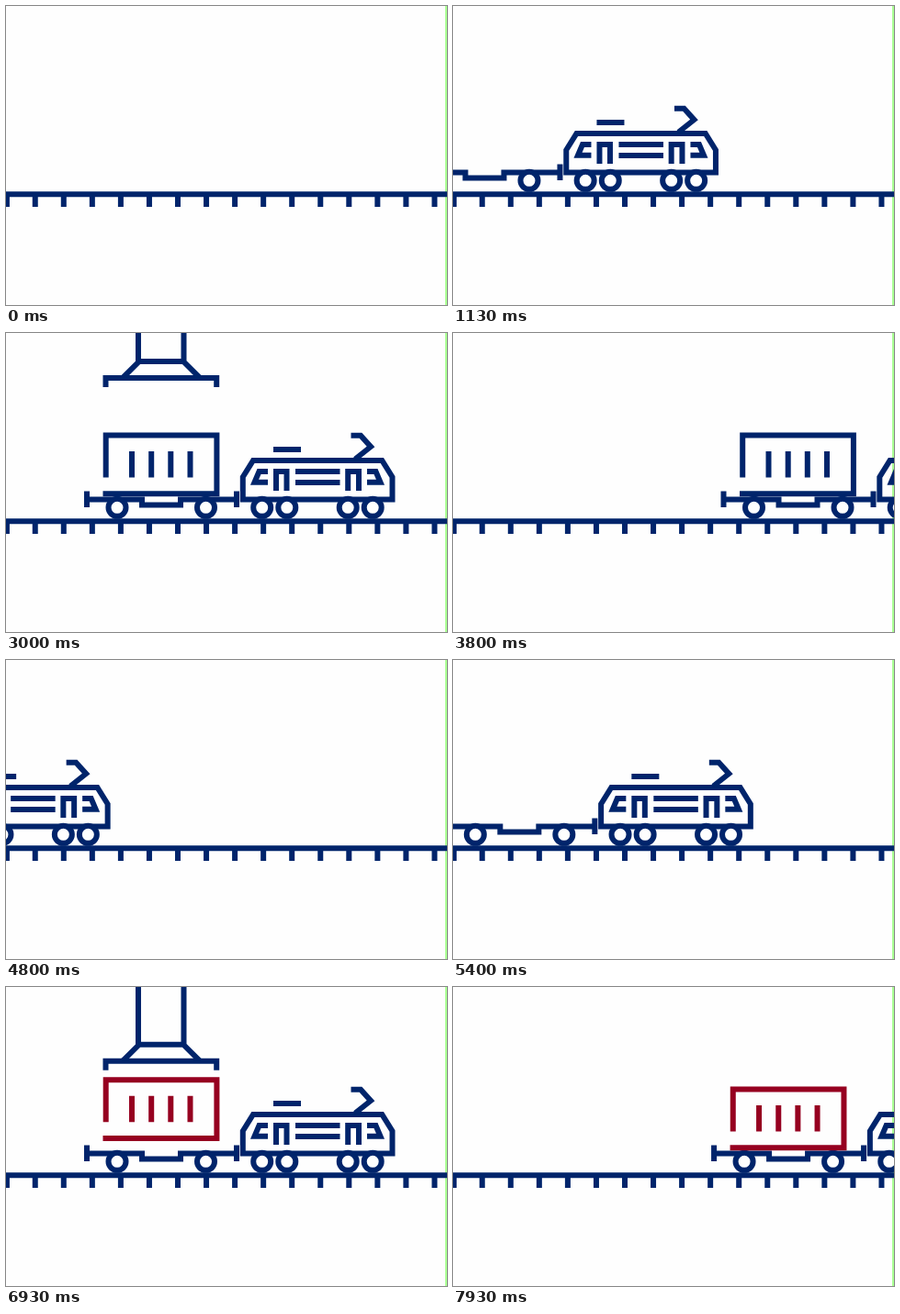
Write an HTML page that moves like this. It is 480x326 px and loops after 8000 ms.

```html
<!DOCTYPE html>
<html lang="en">
<head>
<meta charset="utf-8">
<title>Freight train loading</title>
<style>
  html, body { margin: 0; width: 100%; height: 100%; overflow: hidden; background: #fefefe; }
  svg { display: block; width: 100vw; height: 100vh; }
  .line { fill: none; stroke: #00246b; stroke-width: 6; }
  .wheel { fill: #fefefe; }
</style>
</head>
<body>
<svg viewBox="0 0 480 326">
  <rect x="478" width="2" height="326" fill="#a9ff92"/>
  <g class="line">
    <path d="M0 205.3H480"/>
    <path d="M.7 213.5H480" stroke-width="11" stroke-dasharray="6 25.05" stroke-dashoffset="3"/>
    <path d="M0 213.5H3.7" stroke-width="11"/>
  </g>

  <g id="train" class="line">
    <path d="M88 181.5H148V187.5H190V181.5H251M88 172.5V190M251 172.5V190"/>
    <path d="M257.8 181.5V157L269 139H409.3L420.5 157V181.5Z"/>
    <path d="M291 127H321M375.5 111.7H386L397 124L380 137.5"/>
    <path d="M285 151H275.5L270.5 162.8H285M393 151H402.5L407.5 162.8H393"/>
    <path d="M294 172V151H305.5V172M372.2 172V151H384V172"/>
    <path d="M315 151H363.5M315 163H363.5"/>
    <g id="wheels"></g>
  </g>

  <g id="cargo" class="line">
    <path d="M108.7 157.5V111.6H229.4V175.3H105.5"/>
    <path d="M137 129V157.5M158.2 129V157.5M179.3 129V157.5M200.5 129V157.5"/>
  </g>

  <g id="crane" class="line">
    <path d="M144 -200V73M193.5 -200V73M127 91L145 73H193L211 91"/>
    <path d="M108.5 101V91H229.2V101"/>
  </g>
</svg>
<script>
  const LOOP = 8000, CYCLE = 4150, FRAME = 1000 / 15;
  const ARRIVE = { start: -65, length: 1897, distance: 450 };
  const LOWER = { start: 1890, end: 2838, distance: 179 };
  const RISE_SPEED = 0.26;
  const LEAVE = { start: 3150, rate: 194 / 630 ** 2 };
  const NAVY = '#00246b', RED = '#960020';

  const byId = id => document.getElementById(id);
  const train = byId('train'), cargo = byId('cargo'), crane = byId('crane');
  const move = (node, x, y) => node.setAttribute('transform', `translate(${x.toFixed(2)} ${y.toFixed(2)})`);
  const clamp = (v, min, max) => Math.min(max, Math.max(min, v));

  byId('wheels').innerHTML = [121, 217.5, 278.7, 305.8, 372.2, 399.2]
    .map(x => `<circle class="wheel" cx="${x}" cy="190.3" r="9.5"/>`).join('');

  function trainOffset(t) {
    if (t > LEAVE.start) return LEAVE.rate * (t - LEAVE.start) ** 2;
    const u = clamp((t - ARRIVE.start) / ARRIVE.length, 0, 1);
    return -ARRIVE.distance * (1 + Math.cos(Math.PI * u)) / 2;
  }

  // Height of the load relative to its resting place on the wagon
  function loadOffset(t) {
    const speed = LOWER.distance / (LOWER.end - LOWER.start);
    return clamp((t - LOWER.end) * speed, -200, 0);
  }

  function draw(time) {
    const t = time % CYCLE;
    const x = trainOffset(t), y = loadOffset(t);
    const lift = Math.max(0, t - LOWER.end) * RISE_SPEED;
    move(train, x, 0);
    move(cargo, Math.max(0, x), y);
    move(crane, 0, Math.max(-200, y - lift));
    cargo.style.stroke = time < CYCLE ? NAVY : RED;
  }

  const begin = performance.now();
  function tick() {
    const elapsed = (performance.now() - begin) % LOOP;
    draw(Math.floor((elapsed + 4) / FRAME) * FRAME % LOOP);
    requestAnimationFrame(tick);
  }
  tick();
</script>
</body>
</html>
```
